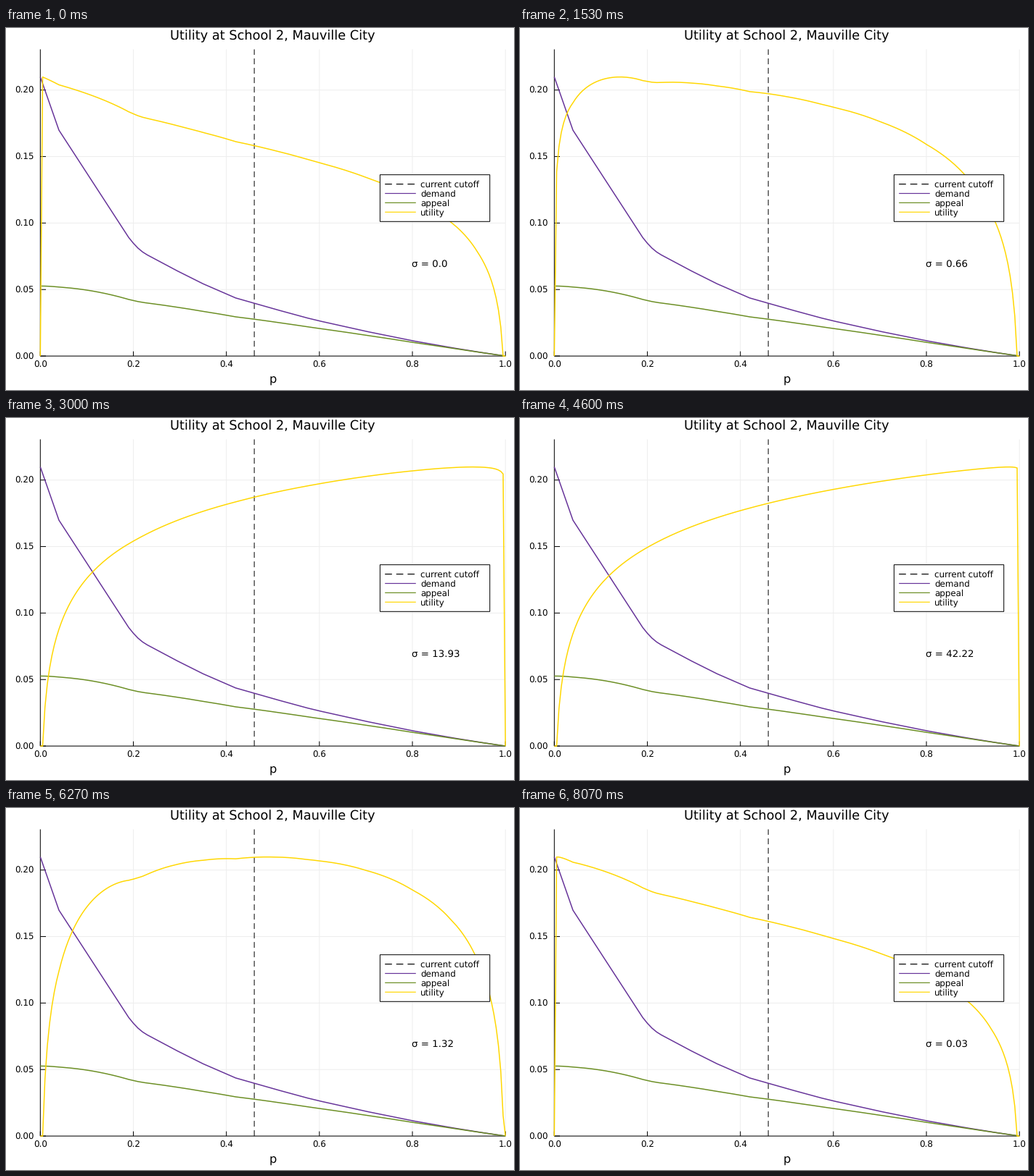
A matplotlib script that plays this animation: 700x500 px, repeating every 8.14 s.

```python
import numpy as np
import matplotlib.pyplot as plt
from matplotlib.animation import FuncAnimation
from matplotlib.patches import Rectangle

W, H, DPI = 700, 500, 100
PT = 72 / DPI  # points per pixel
LOOP, TICK = 8140, 20  # ms
STEP, LAST, PEAK = 1000 / 15, 121, 61
X0, X1, Y0, YTOP = 47.3, 688.2, 453.1, 29.5
YSCALE = 1837
CUTOFF = 0.46
PURPLE, OLIVE, GOLD = "#663399", "#6b8e23", "#ffd700"
DASH = (0, (8, 5))

plt.rcParams.update({"font.family": "DejaVu Sans", "text.hinting": "none",
                     "path.snap": False})

# Density of students choosing the school, constant between rival cutoffs
knots = np.array([0, .04, .19, .20, .21, .22, .23, .29, .35, .42,
                  .50, .57, .60, .70, .80, .88, .94, 1])
density = np.array([1, .538, .43, .37, .29, .22, .187, .175, .152, .1,
                    .096, .085, .078, .071, .062, .057, .052])


def tail(power):
    """Integral of x**(power - 1) * density from p up to 1."""
    p_hi = np.maximum(knots[None, 1:], p[:, None])
    p_lo = np.maximum(knots[None, :-1], p[:, None])
    return ((p_hi**power - p_lo**power) / power * density).sum(axis=1)


p = np.linspace(0, 1, 201)
demand, appeal = tail(1), tail(2)


def utility(sigma):
    u = np.log(demand[1:-1]) + sigma * np.log(p[1:-1])
    u = (u - u.min()) / (u.max() - u.min()) * demand.max()
    return np.concatenate([[0], u, [0]])


def sigma_at(step):
    return 0.0 if step == 0 else 2 ** (7 - abs(step - PEAK) / 5)


def px(x):
    return X0 + x * (X1 - X0)


def py(y):
    return Y0 - y * YSCALE


fig = plt.figure(figsize=(W / DPI, H / DPI), dpi=DPI, facecolor="white")
ax = fig.add_axes([0, 0, 1, 1])
ax.set(xlim=(0, W), ylim=(H, 0))
ax.axis("off")


def line(x, y, color="black", width=1.0, z=2, **kw):
    kw.setdefault("solid_capstyle", "butt")
    return ax.plot(x, y, color=color, lw=width * PT, zorder=z, **kw)[0]


def label(x, y, text, size, ha="center", z=6):
    return ax.text(x, y, text, fontsize=size * PT, ha=ha, va="baseline",
                   color="black", zorder=z)


# Grid, ticks and axes
for v in np.arange(6) / 5:
    x = px(v)
    line([x, x], [YTOP, Y0], "#eeeeee", z=1)
    line([x, x], [Y0, Y0 - 6.5])
    label(x, 469.3, f"{v:.1f}", 11.87)
for v in np.arange(5) / 20:
    y = py(v)
    line([X0, X1], [y, y], "#eeeeee", z=1)
    line([X0, X0 + 7.7], [y, y])
    label(38.4, y + 4.5, f"{v:.2f}", 11.87, "right")
line([X0, X0], [YTOP, Y0])
line([X0, X1], [Y0, Y0])

label(367.5, 15.9, "Utility at School 2, Mauville City", 17.8)
label(367.5, 491, "p", 16.3)

# Curves
line([px(CUTOFF)] * 2, [Y0, YTOP], z=3, ls=DASH)
line(px(p), py(demand), PURPLE, 1.5, 3)
line(px(p), py(appeal), OLIVE, 1.5, 3)
curve = line(px(p), py(utility(0)), GOLD, 1.5, 4)

# Legend
ax.add_patch(Rectangle((515.4, 202.7), 151.3, 64.6, facecolor="white",
                       edgecolor="black", lw=PT, zorder=5))
entries = [("current cutoff", "black", DASH), ("demand", PURPLE, "-"),
           ("appeal", OLIVE, "-"), ("utility", GOLD, "-")]
for n, (name, color, style) in enumerate(entries):
    y = 215.6 + 12.9 * n
    line([522.2, 564.8], [y, y], color, 1.2, 6, ls=style)
    label(571, y + 4.2, name, 11.87, "left")

note = label(559.2, 329.5, "", 13.35, "left")


def update(i):
    # Steps run at 15 per second, their starts rounded to 10 ms
    step = min(int((i * TICK + 15) / STEP), LAST)
    sigma = sigma_at(step)
    curve.set_ydata(py(utility(sigma)))
    note.set_text(f"σ = {round(sigma, 2)}")
    return curve, note


anim = FuncAnimation(fig, update, frames=LOOP // TICK, interval=TICK,
                     repeat=True, repeat_delay=0)
plt.show()
```
